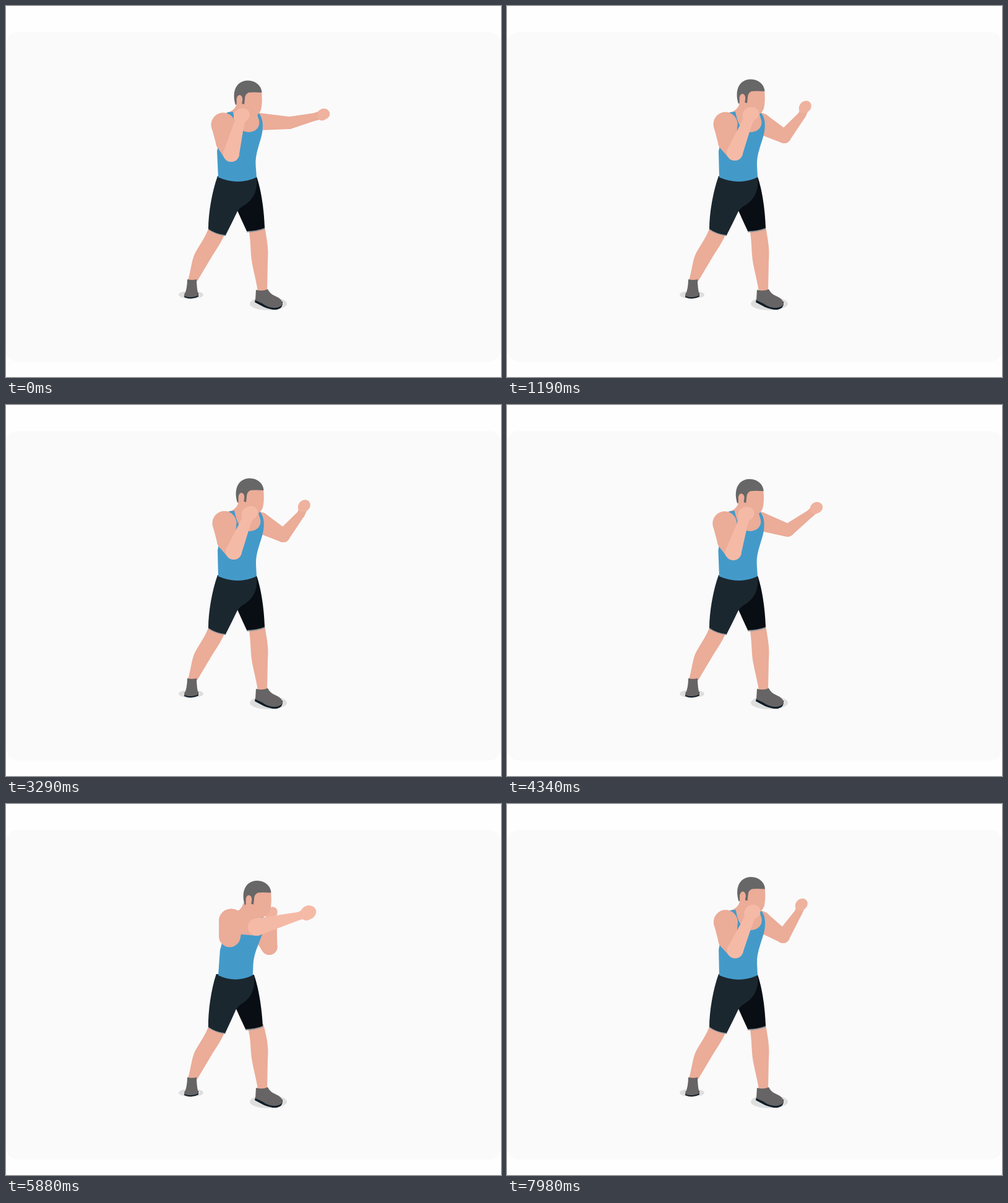
Recreate the animation shown at these times as an HTML page with a canvas. Size 800 by 600 pixels, loop 8000 ms.

```html
<!DOCTYPE html>
<html lang="en">
<head>
<meta charset="utf-8">
<title>Boxing drill</title>
<style>
html, body { margin: 0; width: 100%; height: 100%; overflow: hidden; background: #fefefe; }
canvas { display: block; width: 100vw; height: 100vh; }
</style>
</head>
<body>
<canvas id="stage" width="800" height="600"></canvas>
<script>
const ctx = document.getElementById('stage').getContext('2d');

const LOOP = 8000, STEP = 70, CYCLE = 30;
const SKIN = '#ebac98', LIGHT = '#f5baa6', HAIR = '#676767', SHOE = '#666464';
const SHIRT = '#439ac9', SHORTS = '#1b272f', SHORTS_FAR = '#080e14', SOLE = '#101d28';

// Step within the cycle -> x of the leading fist, and amount of the rear cross
const JAB = [[0, 513], [1, 504], [2, 500], [7, 482], [8, 480], [9, 492], [10, 513], [11, 504],
  [12, 500], [17, 482], [19, 476], [27, 476], [28, 480], [29, 497], [30, 513]];
const CROSS = [[0, 0], [20, 0], [21, .3], [22, .8], [23, 1.12], [24, 1], [25, .6], [26, .25], [28, 0], [30, 0]];

const mix = (a, b, t) => a + (b - a) * t;
const mixAll = (a, b, t) => a.map((v, i) => mix(v, b[i], t));

function track(keys, n) {
  let i = 1;
  while (i < keys.length - 1 && keys[i][0] < n) i++;
  const [n0, v0] = keys[i - 1], [n1, v1] = keys[i];
  return mix(v0, v1, (n - n0) / (n1 - n0));
}

function shape(color, path) {
  ctx.fillStyle = color;
  ctx.fill(new Path2D(path));
}

function oval(color, x, y, rx, ry, turn = 0) {
  ctx.fillStyle = color;
  ctx.beginPath();
  ctx.ellipse(x, y, rx, ry, turn, 0, Math.PI * 2);
  ctx.fill();
}

// Tapered capsule between two [x, y, radius] joints
function limb(color, [x1, y1, r1], [x2, y2, r2]) {
  oval(color, x1, y1, r1, r1);
  oval(color, x2, y2, r2, r2);
  const a = Math.atan2(y2 - y1, x2 - x1);
  const sx = -Math.sin(a), sy = Math.cos(a);
  ctx.beginPath();
  ctx.moveTo(x1 + sx * r1, y1 + sy * r1);
  ctx.lineTo(x2 + sx * r2, y2 + sy * r2);
  ctx.lineTo(x2 - sx * r2, y2 - sy * r2);
  ctx.lineTo(x1 - sx * r1, y1 - sy * r1);
  ctx.fill();
}

// Draws with scale and shear around an anchor point
function skewed(x, y, sx, sy, k, draw) {
  ctx.save();
  ctx.translate(x, y);
  ctx.transform(sx, 0, k, sy, 0, 0);
  ctx.translate(-x, -y);
  draw();
  ctx.restore();
}

function background() {
  ctx.fillStyle = '#fefefe';
  ctx.fillRect(0, 0, 800, 600);
  ctx.fillStyle = '#fafafa';
  ctx.beginPath();
  ctx.roundRect(0, 42, 800, 533, 20);
  ctx.fill();
}

function legs(c) {
  oval('#dedede', 299, 467, 20, 6.5);
  oval('#dedede', 424, 481.5, 30, 10.5);
  const d = -2 * c;
  shape(SKIN, `M${392 + d},358 L${418 + d},356 C421,376 425,392 423,412 L422,462 L407,462
    C404,440 397,420 396,402 C395,386 395,378 ${392 + d},358Z`);
  shape(SKIN, 'M328,358 L354,367 C350,379 341,392 334,403 L309,445 L294,444 C299,428 300,408 307,397 C314,385 322,374 328,358Z');
  shape(SOLE, 'M289,464 L311,464 L311,470 Q300,476 288,471Z');
  shape(SHOE, 'M293,442 Q301,444 308,442 Q308,456 311,468 Q300,474 288,469 Q293,457 293,442Z');
  shape(SOLE, 'M403,474 L447,478 Q448,489 438,491 Q429,492 417,487 L402,479Z');
  shape(SHOE, 'M404,459 Q414,462 423,458 Q427,466 435,469 Q447,474 447,482 Q443,489 431,488 Q422,487 414,481 L403,476Z');
}

function shorts(c) {
  skewed(327, 362, 1 - .033 * c, 1, .02 * c, () => {
    shape('#8f9599', 'M327,356 L356,366 L355,372 Q339,370 327,362Z M389,360 L418,355 L418,361 Q404,366 389,366Z');
    shape(SHORTS_FAR, 'M380,278 L405,276 C412,296 417,328 418,359 Q405,364 389,364 Q382,349 374,331Z');
    shape(SHORTS, 'M342,275 L405,278 C407,297 401,311 387,321 Q379,325 374,332 Q365,351 355,370.5 Q339,369 327,360.5 C327,335 333,300 342,275Z');
  });
}

function torso(c, k) {
  skewed(342, 278, 1 - .1 * c, 1 - .035 * c, -k, () => {
    shape(SKIN, 'M358,173 Q374,169 376,156 L406,160 L408,171 L414,187 Q408,206 392,206 L370,196Z');
    shape(SHIRT, `M360,172 L369,171 C372,184 376,203 393,204 C407,204 413,194 411,185 L407,171
      L410,172 C416,179 418,188 416,203 C413,220 403,238 404,258 L405,277 Q375,291 343,277 L342,235 L350,195Z`);
  });
}

function head(dx, dy) {
  ctx.save();
  ctx.translate(dx, dy);
  shape(SKIN, 'M376,150 L390,134 L416,136 Q418,153 415,166 Q411,176 401,178 L382,179 L373,172 Q376,163 376,150Z');
  shape(HAIR, `M374,158 C368,139 373,119 394,118.5 C408,119 416,128 416.5,138 Q402,137 395,138
    Q389,141 389,148 L388,157 L384,156 L384,147 L376,147 L376,157Z`);
  oval(SKIN, 380.5, 149, 4.8, 7);
  shape(SKIN, 'M375.8,148 L384.8,150 L384,162 L375.5,161Z');
  ctx.restore();
}

function fist(color, x, y, r, turn) {
  oval(color, x, y, r, r * .86, turn);
  oval(color, x - r * .2, y + r * .22, r * .8, r * .76, turn);
}

function farArm(e, c) {
  const p = Math.max(e, 0), back = Math.max(-e, 0);
  const hand = [482 + 31 * e, 163 + 12 * p ** 2.5 - 3 * back, 10.5];
  const shoulder = mixAll([410 - p, 190 - 3 * p, 17 - 3 * p], [410, 205, 14], c);
  const elbow = mixAll([448 + 10 * e, 211 - 22 * p ** 1.8 + 15 * back, 11 - p], [425.5, 231, 13], c);
  const grip = mixAll(hand, [429, 176, 10.5], c);
  const wrist = mixAll([hand[0] - 5 - 8 * p, hand[1] + 13 - 9 * p ** 1.6, 6.2], [430, 186, 7.5], c);
  limb(SKIN, shoulder, elbow);
  limb(SKIN, elbow, wrist);
  limb(SKIN, wrist, [grip[0], grip[1], 7]);
  fist('#efb29f', ...grip, mix(-.7, -.25, p));
}

function nearArm(e, c) {
  const shoulder = mixAll([353 - 2 * e, 191 + e, 19.5], [364, 189.5, 20], c);
  const middle = mixAll([356 - 2 * e, 220, 15], [361.5, 214, 17.5], c);
  const elbow = mixAll([368 - 4 * e, 237 + 2 * e, 13], [405, 199, 14], c);
  const wrist = mixAll([387 - 11 * e, 191 + 2 * e, 8.5], [474, 181, 6.5], c);
  const hand = mixAll([394 - 13 * e, 175 + 2 * e, 13.3], [488.5, 175.5, 13], c);
  limb(SKIN, shoulder, middle);
  limb(SKIN, mixAll(middle, shoulder, Math.min(c, 1)), elbow);
  limb(LIGHT, elbow, wrist);
  limb(LIGHT, wrist, [hand[0], hand[1], 8]);
  fist(LIGHT, ...hand, -.4);
}

// The drill pauses one step and restarts once inside the loop
function cycleStep(ms) {
  const n = Math.floor(ms / STEP);
  return (n < 94 ? n : n === 94 ? 93 : n - 95) % CYCLE;
}

function draw(ms) {
  const n = cycleStep(ms % LOOP);
  const c = track(CROSS, n);
  const e = (track(JAB, n) - 482) / 31;
  const lean = e * (1 - Math.min(c, 1));
  background();
  legs(c);
  farArm(e, c);
  shorts(c);
  torso(c, .09 * c - .022 * lean);
  head(12 * c - 3 * lean, 5.5 * c + 2 * lean);
  nearArm(lean, c);
}

const start = performance.now();
function tick() {
  draw(performance.now() - start);
  requestAnimationFrame(tick);
}
tick();
</script>
</body>
</html>
```
